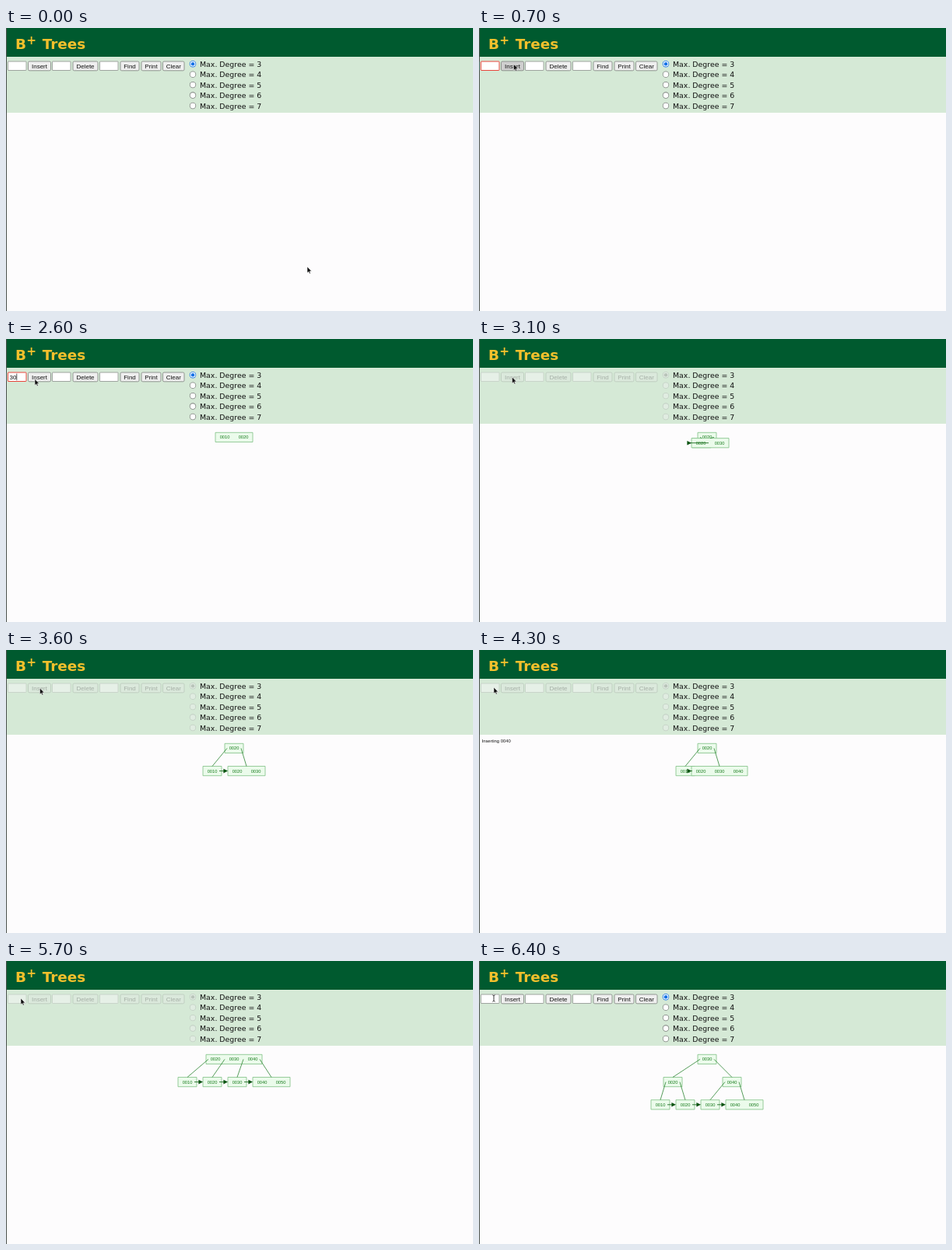
These frames come from a looping animation (600 by 364 pixels, 6.5 s). An HTML page with a canvas:

```html
<!DOCTYPE html>
<html lang="en">
<head>
<meta charset="utf-8">
<title>B+ Trees</title>
<style>
html, body { margin: 0; width: 100%; height: 100%; overflow: hidden; background: #fdfcfd; }
canvas { display: block; width: 600px; height: 364px; }
</style>
</head>
<body>
<canvas id="stage"></canvas>
<script>
const W = 600, H = 364, LOOP = 6500, STEP = 100;
const SANS = '"Liberation Sans", Arial, sans-serif';
const WIDE = '"DejaVu Sans", Verdana, sans-serif';
const canvas = document.getElementById('stage');
const ctx = canvas.getContext('2d');
const dpr = window.devicePixelRatio || 1;
canvas.width = W * dpr;
canvas.height = H * dpr;

const BUTTONS = [[28.5, 29, 'Insert'], [86, 32, 'Delete'], [147, 24, 'Find'], [174, 25, 'Print'], [201.5, 27.5, 'Clear']];
const FIELDS = [2.5, 59.5, 120.5];

// [time, x, y] of the pointer tip
const POINTER = [
  [0, 387, 307], [100, 290, 190], [200, 90, 62], [300, 18, 48], [500, 18, 48],
  [700, 44.5, 46.5], [900, 42, 47], [1100, 19, 48], [1400, 19, 48], [1600, 39, 49],
  [1900, 39.5, 49], [2100, 19, 48], [2400, 19, 48], [2600, 37, 51.5], [2800, 42, 49],
  [3600, 43.5, 49], [3800, 19, 48], [6500, 19, 48]
];
const LOCKED = [[800, 1000], [1700, 2100], [2800, 3700], [4100, 4700], [5000, 6300]];
const MESSAGES = [[800, 1000, '0010'], [1700, 2000, '0020'], [2800, 3100, '0030'], [4200, 4500, '0040'], [5000, 5300, '0050']];
const TYPED = [
  [400, 500, '1'], [500, 700, '10'], [1200, 1300, '2'], [1300, 1600, '20'],
  [2300, 2400, '3'], [2400, 2700, '30'], [3800, 3900, '4'], [3900, 4100, '40'],
  [4800, 4900, '5'], [4900, 5000, '50']
];
const PRESSED = [[700, 800], [1600, 1700], [2700, 2800]];

// Each node: [centre x, level, keys, children, node it splits from]
const POSES = [
  { at: 1000, dur: 0, nodes: { a: [293, 0, '1'] } },
  { at: 2000, dur: 0, nodes: { a: [293, 0, '12'] } },
  { at: 2900, dur: 0, nodes: { a: [293, 0, '123'] } },
  { at: 3100, dur: 400, nodes: { r: [293, 0, '2', 'ab'], a: [265, 1, '1'], b: [309, 1, '23', '', 'a'] } },
  { at: 4300, dur: 0, nodes: { r: [293, 0, '2', 'ab'], a: [265, 1, '1'], b: [309, 1, '234'] } },
  { at: 4400, dur: 200, nodes: { r: [293, 0, '23', 'abc'], a: [249, 1, '1'], b: [281, 1, '2'], c: [325, 1, '34', '', 'b'] } },
  { at: 5300, dur: 0, nodes: { r: [293, 0, '23', 'abc'], a: [249, 1, '1'], b: [281, 1, '2'], c: [325, 1, '345'] } },
  { at: 5400, dur: 200, nodes: { r: [293, 0, '234', 'abcd'], a: [233, 1, '1'], b: [265, 1, '2'], c: [297, 1, '3'], d: [341, 1, '45', '', 'c'] } },
  { at: 5800, dur: 400, nodes: {
    r: [293, 0, '3', 'lm'], l: [249, 1, '2', 'ab', 'r'], m: [325, 1, '4', 'cd', 'r'],
    a: [233, 2, '1'], b: [265, 2, '2'], c: [297, 2, '3'], d: [341, 2, '45'] } }
];

const during = (spans, t) => spans.find(s => t >= s[0] && t < s[1]);
const mix = (a, b, k) => a + (b - a) * k;

function text(str, x, y, size, color, family = SANS, align = 'left', weight = '') {
  ctx.font = `${weight} ${size}px ${family}`;
  ctx.textAlign = align;
  ctx.fillStyle = color;
  ctx.fillText(str, x, y);
}

function box(x, y, w, h, fill, stroke, radius = 0, line = 0.8) {
  ctx.beginPath();
  ctx.roundRect(x, y, w, h, radius);
  ctx.fillStyle = fill;
  ctx.fill();
  ctx.strokeStyle = stroke;
  ctx.lineWidth = line;
  ctx.stroke();
}

function line(x1, y1, x2, y2, color, width) {
  ctx.beginPath();
  ctx.moveTo(x1, y1);
  ctx.lineTo(x2, y2);
  ctx.strokeStyle = color;
  ctx.lineWidth = width;
  ctx.stroke();
}

function polygon(points, fill) {
  ctx.beginPath();
  points.forEach(([x, y]) => ctx.lineTo(x, y));
  ctx.closePath();
  ctx.fillStyle = fill;
  ctx.fill();
}

function disc(x, y, r, fill) {
  ctx.beginPath();
  ctx.arc(x, y, r, 0, Math.PI * 2);
  ctx.fillStyle = fill;
  ctx.fill();
}

function drawPage() {
  ctx.fillStyle = '#fdfcfd';
  ctx.fillRect(0, 0, W, H);
  ctx.fillStyle = '#d5e9d6';
  ctx.fillRect(0, 37, W, 72);
  ctx.fillStyle = '#005a2f';
  ctx.fillRect(0, 0, W, 37);
  ctx.fillStyle = '#4b524e';
  ctx.fillRect(0, 0, 1, H);
  const gold = '#f3c02c';
  text('B', 12, 27, 18.4, gold, WIDE, 'left', 'bold');
  text('+', 26.3, 20.5, 15.3, gold, WIDE, 'left', 'bold');
  text('Trees', 46.7, 27, 18.4, gold, WIDE, 'left', 'bold');
}

function drawControls(t, locked) {
  const pressed = during(PRESSED, t);
  const typed = during(TYPED, t);
  const focused = !locked && t >= 300 && t < 6300;
  FIELDS.forEach((x, i) => {
    const active = i === 0 && focused;
    const border = active ? '#e8453c' : locked ? '#c3cec4' : '#8b908c';
    box(x, 43, 23.5, 11.5, locked ? '#e6f0e7' : '#ffffff', border, 0.5, active ? 1 : 0.8);
  });
  if (typed) {
    text(typed[2], 4.5, 51.6, 8, '#111');
    const end = 4.9 + ctx.measureText(typed[2]).width;
    line(end, 44.5, end, 53.2, '#111', 0.7);
  }
  BUTTONS.forEach(([x, w, label], i) => {
    const fill = locked ? '#dbe9dc' : pressed && i === 0 ? '#cfcfcf' : '#efefef';
    box(x, 43, w, 11.8, fill, locked ? '#bac8bc' : '#7b7f7c', 1.6);
    text(label, x + w / 2, 51.7, 8, locked ? '#a5afa6' : '#111', SANS, 'center');
  });
  for (let i = 0; i < 5; i++) {
    const y = 46.2 + i * 13.45;
    const on = i === 0;
    disc(240, y, 4.2, locked ? '#c1cec3' : on ? '#1673e6' : '#7b807c');
    disc(240, y, 3.4, locked ? '#e0ece1' : '#fff');
    if (on) disc(240, y, 2.3, locked ? '#b9c4ba' : '#1673e6');
    text('Max. Degree = ' + (i + 3), 249, y + 3.7, 9.4, '#111', WIDE);
  }
}

const levelY = level => 126.4 + level * 29.2;

function treeAt(t) {
  let index = -1;
  while (index + 1 < POSES.length && POSES[index + 1].at <= t) index++;
  if (index < 0) return {};
  const pose = POSES[index];
  const before = index ? POSES[index - 1].nodes : {};
  const k = pose.dur ? Math.min(1, (t - pose.at + STEP) / pose.dur) : 1;
  const tree = {};
  for (const [id, [x, level, keys, kids = '', origin]] of Object.entries(pose.nodes)) {
    const from = before[id] || before[origin] || [x, level];
    tree[id] = { x: mix(from[0], x, k), y: levelY(mix(from[1], level, k)), keys, kids, w: 24 * keys.length };
  }
  return tree;
}

function drawTree(t) {
  const tree = treeAt(t);
  const nodes = Object.values(tree);
  const fresh = nodes.length === 1 && nodes[0].keys.length === 1;
  for (const n of nodes) {
    const left = n.x - n.w / 2;
    box(left, n.y - 6.1, n.w, 12.2, '#ebfbeb', fresh ? '#55b85b' : '#7fc184', 0, 0.8);
    [...n.keys].forEach((key, i) =>
      text(`00${key}0`, left + 12 + 24 * i, n.y + 2, 5.7, fresh ? '#17a32c' : '#177a1c', SANS, 'center'));
  }
  for (const n of nodes) {
    [...n.kids].forEach((id, i) => {
      const inset = i === 0 ? 3 : i === n.keys.length ? -3 : 0;
      const child = tree[id];
      line(n.x - n.w / 2 + 24 * i + inset, n.y, child.x, child.y - 6.1, '#2b8532', 0.8);
    });
  }
  const leaves = 'abcd'.split('').map(id => tree[id]).filter(Boolean);
  leaves.slice(1).forEach((next, i) => {
    const prev = leaves[i];
    const tip = next.x - next.w / 2;
    line(prev.x + prev.w / 2 - 3, prev.y, tip - 4, next.y, '#1d6e22', 0.9);
    polygon([[tip, next.y], [tip - 5.6, next.y - 2.8], [tip - 5.6, next.y + 2.8]], '#0d5513');
  });
}

function drawPointer(t, locked) {
  const next = Math.max(1, POINTER.findIndex(p => p[0] > t));
  const [t0, x0, y0] = POINTER[next - 1];
  const [t1, x1, y1] = POINTER[next];
  const k = (t - t0) / (t1 - t0);
  const x = mix(x0, x1, k), y = mix(y0, y1, k);
  if (!locked && x < 27 && y > 42 && y < 55) {
    line(x, y - 3.5, x, y + 3.5, '#222', 0.9);
    for (const s of [-1, 1]) {
      line(x, y + 3.3 * s, x - 1.7, y + 4.3 * s, '#222', 0.8);
      line(x, y + 3.3 * s, x + 1.7, y + 4.3 * s, '#222', 0.8);
    }
    return;
  }
  ctx.save();
  ctx.translate(x, y);
  polygon([[0, 0], [0, 8], [1.8, 6.4], [3, 9.1], [4.3, 8.5], [3.1, 5.9], [5.5, 5.7]], '#111');
  ctx.strokeStyle = '#fff';
  ctx.lineWidth = 0.5;
  ctx.stroke();
  ctx.restore();
}

function draw(now) {
  const t = Math.floor((now % LOOP) / STEP) * STEP;
  const locked = !!during(LOCKED, t);
  const message = during(MESSAGES, t);
  ctx.setTransform(dpr, 0, 0, dpr, 0, 0);
  drawPage();
  drawControls(t, locked);
  if (message) text('Inserting ' + message[2], 3.5, 119.4, 5.9, '#111');
  drawTree(t);
  drawPointer(t, locked);
}

let start;
function tick() {
  const now = performance.now();
  start ??= now;
  draw(now - start);
  requestAnimationFrame(tick);
}
tick();
</script>
</body>
</html>
```
